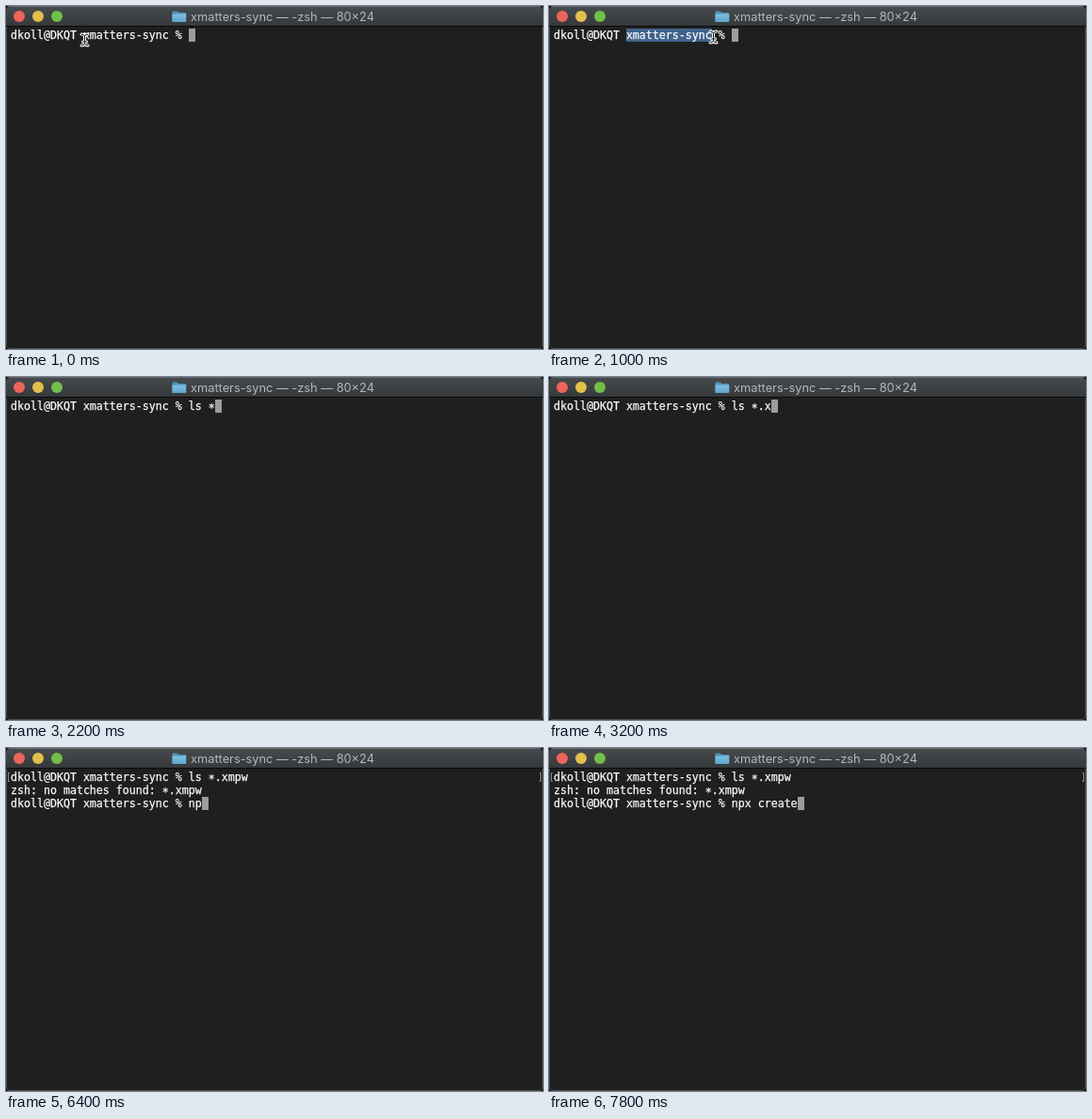
An HTML page that plays this animation: 570 px wide and 365 px high, repeating every 8000 ms.

```html
<!DOCTYPE html>
<html lang="en">
<head>
<meta charset="utf-8">
<title>Terminal</title>
<style>
  html, body { margin: 0; width: 100%; height: 100%; overflow: hidden; background: #111; }
  svg { display: block; width: 570px; height: 365px; }
  text { white-space: pre; }
  .title { font: 400 12.8px Inter, Roboto, sans-serif; fill: #b4b7b8; }
  .term { font: 400 11.627px "DejaVu Sans Mono", monospace; fill: #fbfbfb; stroke: #fbfbfb; stroke-width: .25; }
</style>
</head>
<body>
<svg viewBox="0 0 570 365">
  <defs>
    <linearGradient id="bar" x2="0" y2="1">
      <stop offset="0" stop-color="#474b4d"/>
      <stop offset="1" stop-color="#36393b"/>
    </linearGradient>
    <linearGradient id="dir" x2="0" y2="1">
      <stop offset="0" stop-color="#7fc0e2"/>
      <stop offset="1" stop-color="#5fa5cd"/>
    </linearGradient>
    <clipPath id="win"><rect width="570" height="365" rx="5"/></clipPath>
    <path id="beam" d="M-3.500 -6Q0 -6 0 -3.500Q0 -6 3.500 -6M0 -3.500V3.500M-3.500 6Q0 6 0 3.500Q0 6 3.500 6M-2 2H2"/>
  </defs>

  <g clip-path="url(#win)">
    <rect width="570" height="365" fill="#1f1f1f"/>
    <rect width="570" height="21" fill="url(#bar)"/>
    <rect width="570" height="1" fill="#64686a"/>
    <rect y="21" width="570" height="1" fill="#0b0b0b"/>
  </g>
  <path d="M.5 22V360q0 4.500 4.500 4.500H565q4.500 0 4.500 -4.500V22" fill="none" stroke="#4a4b4b"/>

  <circle cx="14" cy="11" r="6" fill="#ed655a"/>
  <circle cx="34" cy="11" r="6" fill="#e1c04c"/>
  <circle cx="54" cy="11" r="6" fill="#70bf4b"/>
  <path d="M176.500 6.500q0-1 1-1h4.200l1.500 1.500h7q1 0 1 1v8q0 1-1 1h-12.700q-1 0-1-1z" fill="#4f93ba"/>
  <path d="M176.500 8.500h14.700v7.500q0 1-1 1h-12.700q-1 0-1-1z" fill="url(#dir)"/>
  <text class="title" x="196" y="16">xmatters-sync — -zsh — 80×24</text>

  <rect id="sel" x="82" y="24" height="14" fill="#40638c"/>
  <rect id="caret" width="7" height="14" fill="#9c9c9c"/>
  <g id="lines" class="term"></g>
  <path id="marks" d="M4 26.500H2.500V35.500H4M566 26.500H567.500V35.500H566" fill="none" stroke="#8c8c8c"/>
  <g id="mouse" fill="none" stroke-linecap="round">
    <use href="#beam" stroke="#fff" stroke-width="3"/>
    <use href="#beam" stroke="#1a1a1a" stroke-width="1"/>
  </g>
</svg>
<script>
const LOOP = 8000, CELL = 7, LEFT = 5, TOP = 24, ROW = 14;
const PROMPT = "dkoll@DKQT xmatters-sync % ";
const WORD_X = LEFT + 11 * CELL, WORD_LEN = 13;
const ENTER = 5000;

// [time, typed text]
const first = [
  [0, ""], [1600, "l"], [1800, "ls"], [2000, "ls "], [2200, "ls *"],
  [2800, "ls *."], [3200, "ls *.x"], [3400, "ls *.xm"],
  [3800, "ls *.xmp"], [4000, "ls *.xmpw"]
];
const second = [
  [ENTER, ""], [5600, "n"], [6400, "np"], [6600, "npx "], [6800, "npx c"],
  [7000, "npx cr"], [7200, "npx cre"], [7400, "npx crea"],
  [7600, "npx creat"], [7800, "npx create"]
];
// [time, x, y] of the pointer
const drag = [
  [0, 83.5, 36], [200, 90, 36], [400, 112, 35], [600, 136, 34],
  [800, 159, 33], [1000, 174.5, 33], [1200, 175, 36]
];

const $ = id => document.getElementById(id);
const at = (steps, t) => steps.findLast(s => s[0] <= t);
const show = (el, on) => el.setAttribute("visibility", on ? "visible" : "hidden");

// The asterisk sits at mid-height in the terminal face.
const markup = s => s.replace(/\*(.?)/g,
  (_, next) => `<tspan dy="2">*</tspan><tspan dy="-2">${next}</tspan>`);

let last = "";

function draw(t) {
  const done = t >= ENTER;
  const rows = [PROMPT + at(first, t)[1]];
  if (done) rows.push("zsh: no matches found: *.xmpw", PROMPT + at(second, t)[1]);

  const html = rows.map((s, i) =>
    `<text x="${LEFT}" y="${TOP + 11 + i * ROW}">${markup(s)}</text>`).join("");
  if (html !== last) $("lines").innerHTML = last = html;

  const row = rows.length - 1;
  $("caret").setAttribute("x", LEFT + rows[row].length * CELL);
  $("caret").setAttribute("y", TOP + row * ROW);
  show($("marks"), done);

  const [, mx, my] = at(drag, t);
  const cells = Math.min(WORD_LEN, Math.round((mx - WORD_X) / CELL));
  $("sel").setAttribute("width", cells * CELL);
  show($("sel"), t < 1400 && cells > 0);
  $("mouse").setAttribute("transform", `translate(${mx} ${my})`);
  show($("mouse"), t < 1600);
}

const begin = performance.now();
function tick() {
  draw((performance.now() - begin) % LOOP);
  requestAnimationFrame(tick);
}
tick();
</script>
</body>
</html>
```
